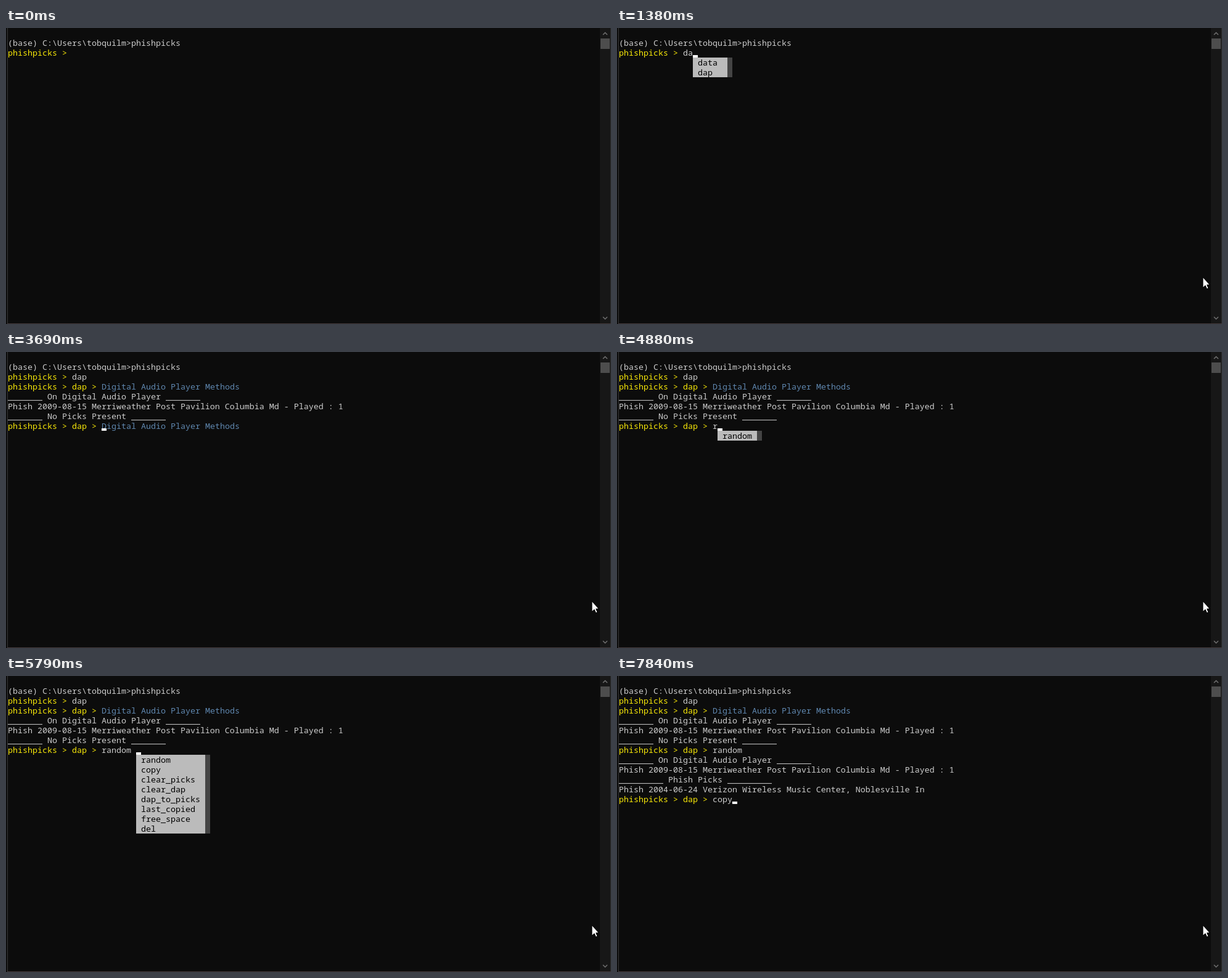
An HTML page with a canvas for the animation above (8000 ms loop, 981 by 481 pixels).

```html
<!DOCTYPE html>
<html lang="en">
<head>
<meta charset="utf-8">
<title>Terminal session</title>
<style>
  html, body { margin: 0; width: 100%; height: 100%; overflow: hidden; background: #0c0c0c; }
  canvas { display: block; }
</style>
</head>
<body>
<canvas id="stage" width="981" height="481"></canvas>
<script>
const ctx = document.getElementById('stage').getContext('2d');
const LOOP = 8000, CELL_W = 8, CELL_H = 16, LEFT = 3;
const GREY = '#cccccc', YELLOW = '#f8e808', HINT_BLUE = '#5f87af';

const HINT = 'Digital Audio Player Methods';
const ROOT = 'phishpicks > ', DAP = 'phishpicks > dap > ';
const ON_DAP = '_______ On Digital Audio Player _______';
const PLAYED = 'Phish 2009-08-15 Merriweather Post Pavilion Columbia Md - Played : 1';
const METHODS = ['random', 'copy', 'clear_picks', 'clear_dap', 'dap_to_picks',
                 'last_copied', 'free_space', 'del'];

// Finished lines: start time, row, prompt, text, text colour
const LINES = [
  [0, 1, '', '(base) C:\\Users\\tobquilm>phishpicks'],
  [2630, 2, ROOT, 'dap'],
  [3690, 3, DAP, HINT, HINT_BLUE],
  [3690, 4, '', ON_DAP],
  [3690, 5, '', PLAYED],
  [3690, 6, '', '_______ No Picks Present _______'],
  [6320, 7, DAP, 'random'],
  [6320, 8, '', ON_DAP],
  [6320, 9, '', PLAYED],
  [6320, 10, '', '_________ Phish Picks _________'],
  [6320, 11, '', 'Phish 2004-06-24 Verizon Wireless Music Center, Noblesville In']
];

// Input states; the menu opens at the caret unless "at" gives a typed length
const top2 = { row: 2, prompt: ROOT, items: ['data', 'dap'] };
const pick = { row: 7, prompt: DAP, items: ['random'] };
const copy = { row: 12, prompt: DAP, items: ['copy'] };
const INPUTS = [
  { t: 0, row: 2, prompt: ROOT, text: '', noCaret: true },
  { t: 930, row: 2, prompt: ROOT, text: '' },
  { ...top2, t: 1320, text: 'd' },
  { ...top2, t: 1380, text: 'da' },
  { ...top2, t: 1910, text: 'data', at: 2, chosen: 0 },
  { ...top2, t: 2300, text: 'dap', at: 2, chosen: 1 },
  { t: 2630, row: 3, prompt: DAP, text: '', hint: true },
  { t: 3690, row: 7, prompt: DAP, text: '', hint: true },
  { ...pick, t: 4880, text: 'r' },
  { ...pick, t: 5010, text: 'ra' },
  { ...pick, t: 5100, text: 'ran' },
  { ...pick, t: 5200, text: 'rand' },
  { ...pick, t: 5470, text: 'random', at: 4, chosen: 0 },
  { ...pick, t: 5790, text: 'random ', items: METHODS },
  { t: 6120, row: 7, prompt: DAP, text: 'random' },
  { t: 6320, row: 12, prompt: DAP, text: '', hint: true, caret: '#d2cec4' },
  { ...copy, t: 7510, text: 'co' },
  { ...copy, t: 7640, text: 'cop' },
  { t: 7840, row: 12, prompt: DAP, text: 'copy' }
];

const POINTER = [
  { t: 130, x: 937, y: 457 }, { t: 200, x: 941, y: 430 }, { t: 260, x: 945, y: 408 },
  { t: 330, x: 948, y: 392 }, { t: 460, x: 950, y: 405 }
];

const latest = (list, t) => list.filter(s => s.t <= t).pop();
const colX = col => LEFT + col * CELL_W;

function box(x, y, w, h, color) {
  ctx.fillStyle = color;
  ctx.fillRect(x, y, w, h);
}

function write(text, col, row, color) {
  ctx.fillStyle = color;
  ctx.fillText(text, colX(col), row * CELL_H + 13);
}

function writeLine(row, prompt, text, color = GREY) {
  write(prompt, 0, row, YELLOW);
  write(text, prompt.length, row, color);
}

function drawMenu({ items, chosen }, col, row) {
  const cells = Math.max(7, ...items.map(s => s.length + 2));
  const x = colX(col), w = cells * CELL_W;
  items.forEach((item, i) => {
    const on = i === chosen;
    box(x, (row + i) * CELL_H, w, CELL_H, on ? '#888888' : '#bbbbbb');
    write(item, col + 1, row + i, on ? '#ffffff' : '#000000');
  });
  box(x + w, row * CELL_H, CELL_W, items.length * CELL_H, '#444444');
}

function drawInput(s) {
  const start = s.prompt.length, end = start + s.text.length;
  writeLine(s.row, s.prompt, s.text);
  if (s.hint) write(HINT, start, s.row, HINT_BLUE);
  if (!s.noCaret) box(colX(end), s.row * CELL_H + 12, CELL_W, 4, s.caret || '#ffffff');
  if (s.items) drawMenu(s, s.at === undefined ? end : start + s.at, s.row + 1);
}

function chevron(y, dir) {
  ctx.strokeStyle = '#707070';
  ctx.lineWidth = 1.5;
  ctx.beginPath();
  ctx.moveTo(968, y + 2 * dir);
  ctx.lineTo(971.5, y - 1.5 * dir);
  ctx.lineTo(975, y + 2 * dir);
  ctx.stroke();
}

function drawFrame() {
  box(0, 0, 981, 481, '#0c0c0c');
  box(2, 0, 1, 481, '#363636');
  box(963, 0, 17, 480, '#171717');
  box(964, 17, 15, 17, '#4d4d4d');
  chevron(9, 1);
  chevron(471.5, -1);
  box(980, 0, 1, 481, '#303030');
  box(2, 480, 979, 1, '#443a3c');
}

function drawPointer({ x, y }) {
  const shape = [[0, 0], [0, 17], [4, 13.5], [6.5, 19], [9, 18], [6.7, 12.5], [11, 12]];
  ctx.beginPath();
  shape.forEach(([dx, dy]) => ctx.lineTo(x + dx, y + dy));
  ctx.closePath();
  ctx.fillStyle = '#ffffff';
  ctx.fill();
  ctx.strokeStyle = '#000000';
  ctx.lineWidth = 1;
  ctx.stroke();
}

function render(t) {
  ctx.font = '13.3333px "Noto Sans Mono", monospace';
  ctx.textBaseline = 'alphabetic';
  drawFrame();
  for (const [from, ...line] of LINES) if (t >= from) writeLine(...line);
  drawInput(latest(INPUTS, t));
  const spot = latest(POINTER, t);
  if (spot) drawPointer(spot);
}

const began = performance.now();
function tick() {
  render((performance.now() - began) % LOOP);
  requestAnimationFrame(tick);
}
tick();
</script>
</body>
</html>
```
